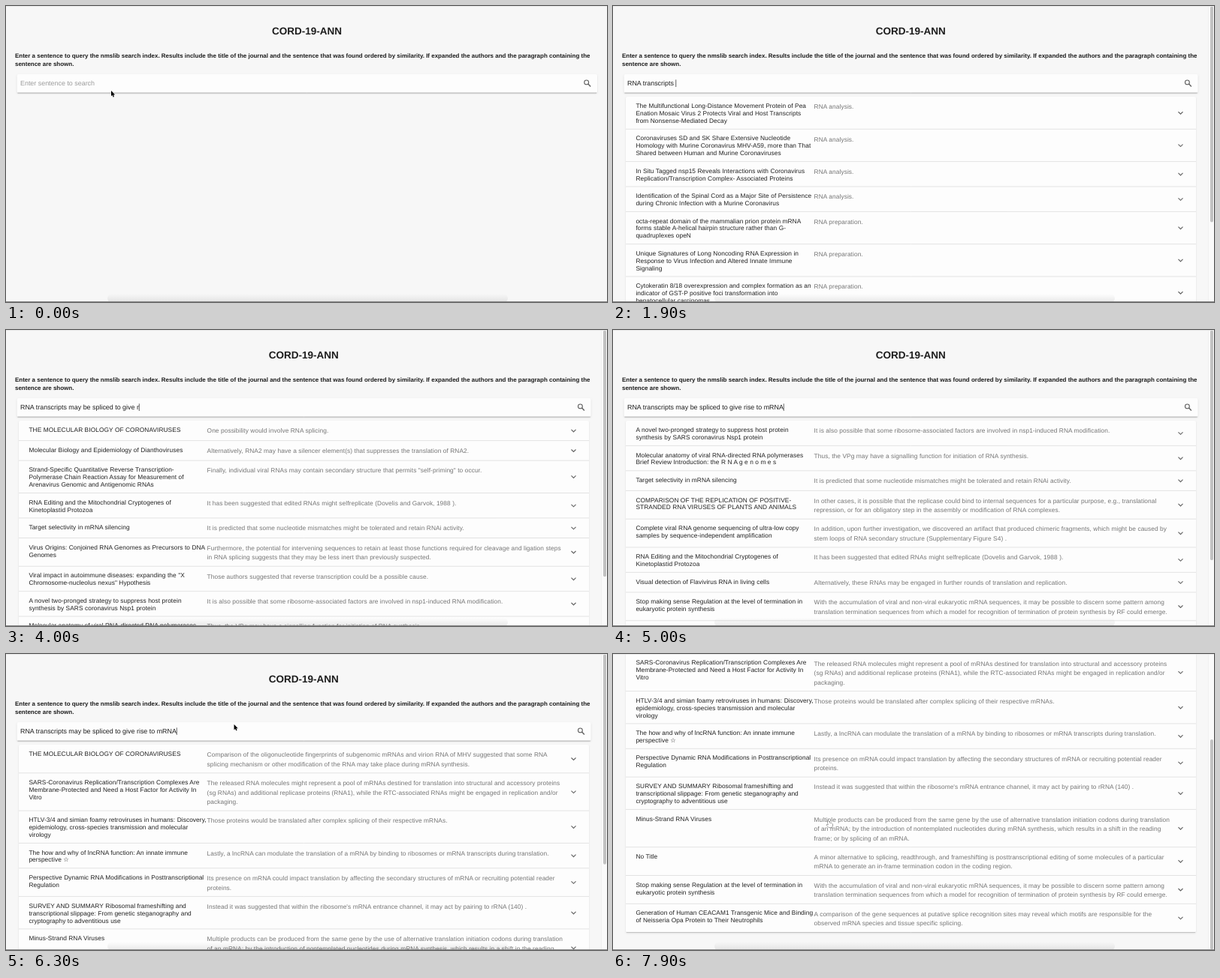
Recreate the animation shown at these times as an HTML page with a canvas. Size 800x395 px, loop 8000 ms.

```html
<!DOCTYPE html>
<html lang="en">
<head>
<meta charset="utf-8">
<title>CORD-19-ANN</title>
<style>
html, body { margin: 0; width: 100%; height: 100%; overflow: hidden; background: #f7f7f7; }
canvas { display: block; width: 800px; height: 395px; }
</style>
</head>
<body>
<canvas id="stage"></canvas>
<script>
const W = 800, H = 395, LOOP = 8000, STEP = 100;
const FONT = '"Liberation Sans", Helvetica, "DejaVu Sans", sans-serif';
const LIST_TOP = 121, BODY = 8.34, SEC_LINE = 12.5, TITLE_LINE = 9.9;

const canvas = document.getElementById('stage');
const ctx = canvas.getContext('2d');
const dpr = window.devicePixelRatio || 1;
canvas.width = W * dpr;
canvas.height = H * dpr;

// A row is "title#sentence", with | between lines.
const BIOLOGY = 'THE MOLECULAR BIOLOGY OF CORONAVIRUSES#';
const DIANTHO = 'Molecular Biology and Epidemiology of Dianthoviruses#';
const SPLICING = BIOLOGY + 'One possibility would involve RNA splicing.';
const EDITING = 'RNA Editing and the Mitochondrial Cryptogenes of|Kinetoplastid Protozoa#It has been suggested that edited RNAs might selfreplicate (Dovelis and Garvok, 1988 ).';
const TARGET = 'Target selectivity in mRNA silencing#It is predicted that some nucleotide mismatches might be tolerated and retain RNAi activity.';
const NOVEL = 'A novel two-pronged strategy to suppress host protein|synthesis by SARS coronavirus Nsp1 protein#It is also possible that some ribosome-associated factors are involved in nsp1-induced RNA modification.';
const ANATOMY = 'Molecular anatomy of viral RNA-directed RNA polymerases|Brief Review Introduction: the R N A g e n o m e s#Thus, the VPg may have a signalling function for initiation of RNA synthesis.';
const STOP = 'Stop making sense Regulation at the level of termination in|eukaryotic protein synthesis#With the accumulation of viral and non-viral eukaryotic mRNA sequences, it may be possible to discern some pattern among|translation termination sequences from which a model for recognition of termination of protein synthesis by RF could emerge.';

// page: full page height, which sizes the scrollbar thumb
const lists = [
  { at: 1300, page: 540, rows: [
    'The Multifunctional Long-Distance Movement Protein of Pea|Enation Mosaic Virus 2 Protects Viral and Host Transcripts|from Nonsense-Mediated Decay#RNA analysis.',
    'Coronaviruses SD and SK Share Extensive Nucleotide|Homology with Murine Coronavirus MHV-A59, more than That|Shared between Human and Murine Coronaviruses#RNA analysis.',
    'In Situ Tagged nsp15 Reveals Interactions with Coronavirus|Replication/Transcription Complex- Associated Proteins#RNA analysis.',
    'Identification of the Spinal Cord as a Major Site of Persistence|during Chronic Infection with a Murine Coronavirus#RNA analysis.',
    'octa-repeat domain of the mammalian prion protein mRNA|forms stable A-helical hairpin structure rather than G-|quadruplexes opeN#RNA preparation.',
    'Unique Signatures of Long Noncoding RNA Expression in|Response to Virus Infection and Altered Innate Immune|Signaling#RNA preparation.',
    'Cytokeratin 8/18 overexpression and complex formation as an|indicator of GST-P positive foci transformation into|hepatocellular carcinomas#RNA preparation.'
  ] },
  { at: 2800, page: 446, rows: [
    DIANTHO + 'RNA1 and RNA2 might use distinct translation factors.',
    SPLICING,
    'Seasonality and selective trends in viral acute respiratory tract|infections q#Changes to RNA secondary structure (discussed below) may have similar effects.',
    'Structural Basis for the dsRNA Specificity of the Lassa Virus|NP Exonuclease#It is possible that interaction between Y429 and the RNA may facilitate this action.',
    'Diversion of stress granules and P-bodies during viral infection#These roles may indirectly affect RNA granule function.',
    'viruses Packaging of Genomic RNA in Positive-Sense Single-|Stranded RNA Viruses: A Complex Story#It is plausible that RNA replication and/or co-translational packaging play a role in the selectivity of this process.',
    'Defective RNAs of Clover Yellow Mosaic Virus Encode|Nonstructural/Coat Protein Fusion Products#One possibility is that translation of the 1.2-kb RNAs may stabilize them.',
    'Nucleic Acid Immunity#There, RNAi may be useful as a therapeutic target.',
    'Phosphatidic Acid Produced by Phospholipase D Promotes|RNA Replication of a Plant RNA Virus#This may reflect differences in the translation and replication mechanisms between RNA1 and RNA2.'
  ] },
  { at: 3600, page: 473, rows: [
    SPLICING,
    DIANTHO + 'Alternatively, RNA2 may have a silencer element(s) that suppresses the translation of RNA2.',
    'Strand-Specific Quantitative Reverse Transcription-|Polymerase Chain Reaction Assay for Measurement of|Arenavirus Genomic and Antigenomic RNAs#Finally, individual viral RNAs may contain secondary structure that permits "self-priming" to occur.',
    EDITING,
    TARGET,
    'Virus Origins: Conjoined RNA Genomes as Precursors to DNA|Genomes#Furthermore, the potential for intervening sequences to retain at least those functions required for cleavage and ligation steps|in RNA splicing suggests that they may be less inert than previously suspected.',
    'Viral impact in autoimmune diseases: expanding the "X|Chromosome-nucleolus nexus" Hypothesis#Those authors suggested that reverse transcription could be a possible cause.',
    NOVEL,
    ANATOMY
  ] },
  { at: 4900, page: 507, rows: [
    NOVEL,
    ANATOMY,
    TARGET,
    'COMPARISON OF THE REPLICATION OF POSITIVE-|STRANDED RNA VIRUSES OF PLANTS AND ANIMALS#In other cases, it is possible that the replicase could bind to internal sequences for a particular purpose, e.g., translational|repression, or for an obligatory step in the assembly or modification of RNA complexes.',
    'Complete viral RNA genome sequencing of ultra-low copy|samples by sequence-independent amplification#In addition, upon further investigation, we discovered an artifact that produced chimeric fragments, which might be caused by|stem loops of RNA secondary structure (Supplementary Figure S4) .',
    EDITING,
    'Visual detection of Flavivirus RNA in living cells#Alternatively, these RNAs may be engaged in further rounds of translation and replication.',
    STOP
  ] },
  { at: 5900, page: 555, rows: [
    BIOLOGY + 'Comparison of the oligonucleotide fingerprints of subgenomic mRNAs and virion RNA of MHV suggested that some RNA|splicing mechanism or other modification of the RNA may take place during mRNA synthesis.',
    'SARS-Coronavirus Replication/Transcription Complexes Are|Membrane-Protected and Need a Host Factor for Activity In|Vitro#The released RNA molecules might represent a pool of mRNAs destined for translation into structural and accessory proteins|(sg RNAs) and additional replicase proteins (RNA1), while the RTC-associated RNAs might be engaged in replication and/or|packaging.',
    'HTLV-3/4 and simian foamy retroviruses in humans: Discovery,|epidemiology, cross-species transmission and molecular|virology#Those proteins would be translated after complex splicing of their respective mRNAs.',
    'The how and why of lncRNA function: An innate immune|perspective ☆#Lastly, a lncRNA can modulate the translation of a mRNA by binding to ribosomes or mRNA transcripts during translation.',
    'Perspective Dynamic RNA Modifications in Posttranscriptional|Regulation#Its presence on mRNA could impact translation by affecting the secondary structures of mRNA or recruiting potential reader|proteins.',
    'SURVEY AND SUMMARY Ribosomal frameshifting and|transcriptional slippage: From genetic steganography and|cryptography to adventitious use#Instead it was suggested that within the ribosome\'s mRNA entrance channel, it may act by pairing to rRNA (140) .',
    'Minus-Strand RNA Viruses#Multiple products can be produced from the same gene by the use of alternative translation initiation codons during translation|of an mRNA; by the introduction of nontemplated nucleotides during mRNA synthesis, which results in a shift in the reading|frame; or by splicing of an mRNA.',
    'No Title#A minor alternative to splicing, readthrough, and frameshifting is posttranscriptional editing of some molecules of a particular|mRNA to generate an in-frame termination codon in the coding region.',
    STOP,
    'Generation of Human CEACAM1 Transgenic Mice and Binding|of Neisseria Opa Protein to Their Neutrophils#A comparison of the gene sequences at putative splice recognition sites may reveal which motifs are responsible for the|observed mRNA species and tissue specific splicing.'
  ] }
];

for (const list of lists) {
  list.rows = list.rows.map(row => {
    const [title, sec] = row.split('#').map(s => s.split('|'));
    const h = Math.max(26.6, 13.6 + TITLE_LINE * title.length, 12.8 + SEC_LINE * sec.length);
    return { title, sec, h };
  });
}

const QUERY = 'RNA transcripts may be spliced to give rise to mRNA';
const typing = [[299, 0], [300, 1], [600, 3], [799, 3], [800, 4], [1000, 6], [1299, 6], [1300, 8],
  [1900, 16], [2200, 19], [2399, 19], [2400, 20], [3200, 30], [4000, 40], [4700, 51]];
const scrolling = [[6600, 0], [6700, 38], [6800, 85], [6900, 115.5], [7100, 138], [7300, 154], [7500, 159.5]];
const handX = [[6200, 306], [6700, 294], [7400, 294], [7900, 288]];
const handY = [[6200, 74], [6700, 174], [7400, 174], [7900, 227]];

// Linear interpolation through [time, value] points.
function track(points, t) {
  if (t <= points[0][0]) return points[0][1];
  for (let i = 1; i < points.length; i++) {
    const [t0, a] = points[i - 1], [t1, b] = points[i];
    if (t <= t1) return a + (b - a) * (t - t0) / (t1 - t0);
  }
  return points[points.length - 1][1];
}

function text(str, x, y, size, color, opt = {}) {
  ctx.font = `${opt.bold ? 'bold ' : ''}${size}px ${FONT}`;
  ctx.letterSpacing = (opt.spacing || 0) * size + 'px';
  ctx.textAlign = opt.align || 'left';
  ctx.fillStyle = color;
  ctx.fillText(str, x, y);
}

function paper(x, y, w, h, edge) {
  ctx.save();
  ctx.shadowColor = 'rgba(0,0,0,.13)';
  ctx.shadowBlur = 2 * dpr;
  ctx.shadowOffsetY = dpr;
  ctx.fillStyle = '#fdfdfd';
  ctx.beginPath();
  ctx.roundRect(x, y, w, h, 2);
  ctx.fill();
  ctx.restore();
  line([[x + 1, y + h], [x + w - 1, y + h]], edge, 1);
}

function line(points, color, width) {
  ctx.beginPath();
  points.forEach(([x, y]) => ctx.lineTo(x, y));
  ctx.strokeStyle = color;
  ctx.lineWidth = width;
  ctx.stroke();
}

function searchIcon(x, y) {
  ctx.beginPath();
  ctx.arc(x - 1.3, y - 1.3, 2.9, 0, Math.PI * 2);
  ctx.strokeStyle = '#5f5f5f';
  ctx.lineWidth = 1.1;
  ctx.stroke();
  line([[x + 0.9, y + 0.9], [x + 4.2, y + 4.2]], '#5f5f5f', 1.4);
}

function header(t, right) {
  const mid = right / 2 + 0.5;
  text('CORD-19-ANN', mid, 38.3, 13.5, '#1d1d1d', { bold: true, align: 'center' });
  text('Enter a sentence to query the nmslib search index. Results include the title of the journal and the sentence that was found ordered by similarity. If expanded the authors and the paragraph containing the', 12, 68.5, 7.985, '#1d1d1d', { bold: true });
  text('sentence are shown.', 12, 79.5, 7.985, '#1d1d1d', { bold: true });

  paper(14.5, 91, right - 27.5, 25, '#b4b4b4');
  searchIcon(right - 26, 103.2);
  const typed = QUERY.slice(0, Math.floor(track(typing, t) + 1e-6));
  if (!typed) {
    text('Enter sentence to search', 19, 106, 8.91, '#9b9b9b');
    return;
  }
  text(typed, 19, 106, 8.91, '#1d1d1d');
  const caret = 19.4 + ctx.measureText(typed).width;
  line([[caret, 98.3], [caret, 108]], '#222', 0.7);
}

function results(list) {
  const known = list.rows.reduce((sum, r) => sum + r.h, 0);
  paper(17, LIST_TOP, 759, Math.max(known, list.page - LIST_TOP - 24), '#c4c4c4');
  let y = LIST_TOP;
  for (const { title, sec, h } of list.rows) {
    title.forEach((s, i) => text(s, 30.4, y + 15.1 + i * TITLE_LINE, BODY, '#212121', { spacing: 0.00938 }));
    sec.forEach((s, i) => text(s, 267.6, y + 16.2 + i * SEC_LINE, BODY, '#757575', { spacing: 0.00938 }));
    const c = y + h / 2;
    line([[752.5, c - 1.4], [755.5, c + 1.6], [758.5, c - 1.4]], '#606060', 1.1);
    y += h;
    if (y < list.page - 30) line([[17, y], [776, y]], '#dcdcdc', 0.8);
  }
}

function scrollbar(scroll, page) {
  ctx.fillStyle = '#fafafa';
  ctx.fillRect(792, 0, 8, H);
  ctx.fillStyle = '#ececec';
  ctx.fillRect(792, 0, 0.6, H);
  ctx.fillStyle = '#c1c1c1';
  ctx.beginPath();
  ctx.roundRect(795, scroll / page * H + 0.5, 4, H * H / page - 1, 2);
  ctx.fill();
}

function shape(path, x, y, fill, stroke) {
  ctx.save();
  ctx.translate(x, y);
  ctx.lineJoin = 'round';
  ctx.lineWidth = 0.8;
  ctx.fillStyle = fill;
  ctx.strokeStyle = stroke;
  ctx.fill(path);
  ctx.stroke(path);
  ctx.fill(path);
  ctx.restore();
}

const arrow = new Path2D('M0 0V7.2L1.6 5.7L2.7 8.3L3.9 7.8L2.8 5.3H5Z');
const hand = new Path2D('M-2.4 -4.2Q-1.5 -5.1 -.8 -4L.1 -1.5Q1 -2.2 1.6 -1.3Q2.5 -1.8 3 -.9Q4.1 -1 4.2 .3L4.1 2.6L3.2 4.6H-.7L-3.6 1.5Q-3.9 .4 -2.7 .6L-1.4 1.4Z');

function pointer(t) {
  if (t < 300) return shape(arrow, 140, 113.1, '#000', '#fff');
  if (t < 6200) return;
  const x = track(handX, t), y = track(handY, t);
  if (y < LIST_TOP) shape(arrow, x, y, '#000', '#fff');
  else shape(hand, x, y, '#fff', '#222');
}

function dockShade(t) {
  if (t >= 6600 && t < 7600) return;
  const g = ctx.createLinearGradient(0, 384, 0, 394);
  g.addColorStop(0, 'rgba(0,0,0,0)');
  g.addColorStop(1, 'rgba(0,0,0,.07)');
  ctx.fillStyle = g;
  ctx.beginPath();
  ctx.roundRect(135, 384, 533, 12, 6);
  ctx.fill();
}

function draw(t) {
  const list = lists.filter(l => l.at <= t).pop();
  const scroll = track(scrolling, t);
  ctx.setTransform(dpr, 0, 0, dpr, 0, 0);
  ctx.textRendering = 'geometricPrecision';
  ctx.fillStyle = '#f7f7f7';
  ctx.fillRect(0, 0, W, H);

  ctx.save();
  ctx.translate(0, -scroll);
  header(t, list ? 791.7 : 800);
  if (list) results(list);
  ctx.restore();

  if (list) scrollbar(scroll, list.page);
  dockShade(t);
  ctx.fillStyle = '#8c8c8c';
  ctx.fillRect(0, 394, W, 1);
  ctx.fillStyle = '#e2e2e2';
  ctx.fillRect(0, 0, W, 0.7);
  pointer(t);
}

const start = performance.now();
function tick() {
  const t = (performance.now() - start) % LOOP;
  draw(Math.floor(t / STEP) * STEP);
  requestAnimationFrame(tick);
}
tick();
</script>
</body>
</html>
```
